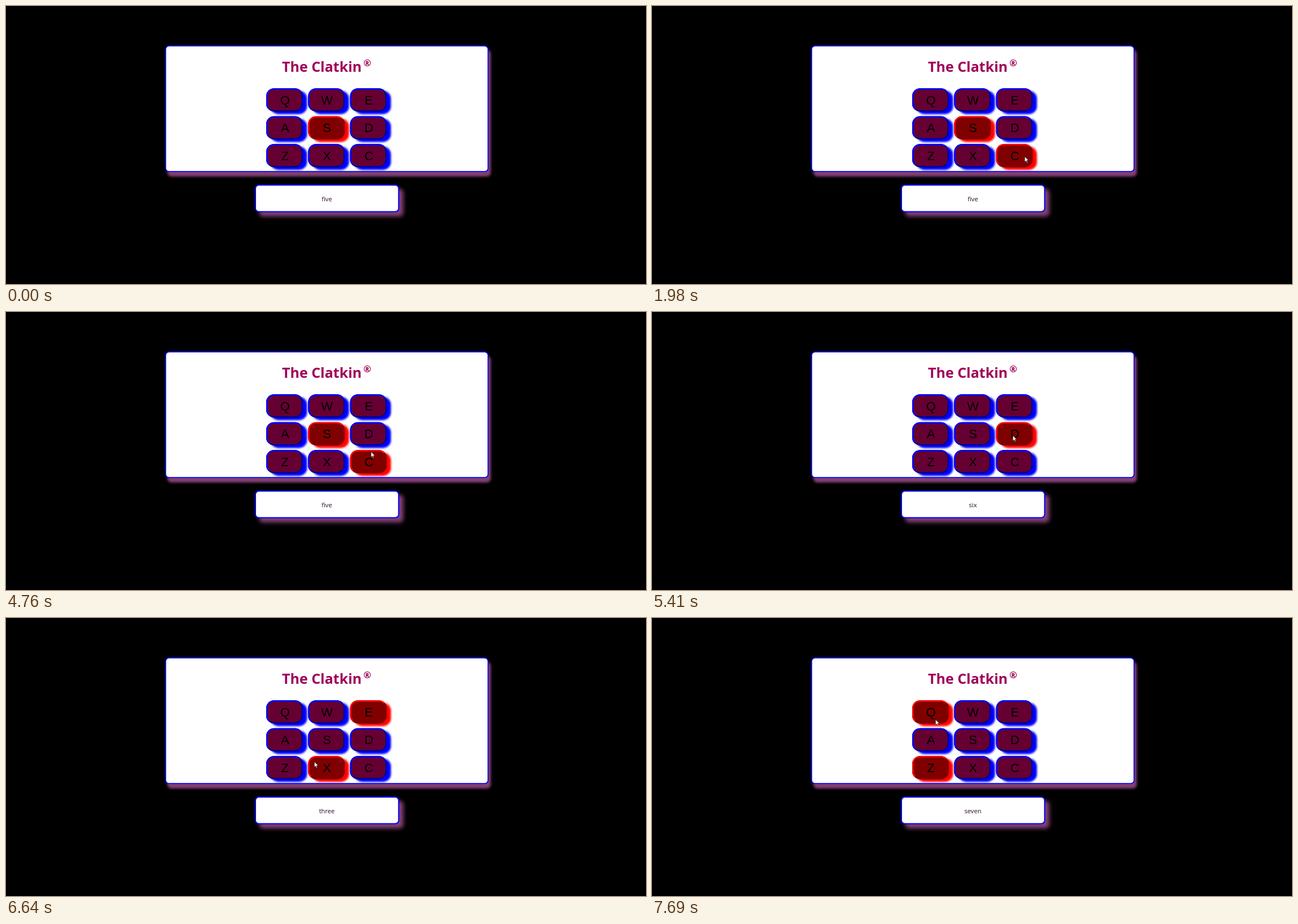
An HTML page with a canvas for the animation above (8 s loop, 1134 by 494 pixels).

```html
<!DOCTYPE html>
<html lang="en">
<head>
<meta charset="utf-8">
<title>Key pad</title>
<style>
  html, body { margin: 0; width: 100%; height: 100%; overflow: hidden; background: #000; }
  canvas { display: block; }
</style>
</head>
<body>
<canvas id="stage" width="1134" height="494"></canvas>
<script>
const ctx = document.getElementById('stage').getContext('2d');
const LOOP = 8000;
const STEP = 69; // the pointer moves in steps of about this many ms
const SANS = '"Open Sans", "Noto Sans", sans-serif';
const MAUVE = '#834074';
const KEY = { w: 65, h: 41.5, r: 14, border: 2.5 };

const keys = [...'QWEASDZXC'].map((label, i) => ({
  label,
  x: 461 + (i % 3) * 74.3,
  y: 146.2 + Math.floor(i / 3) * 49.5
}));

const presses = [
  { at: 0, key: 'S', word: 'five' },
  { at: 5270, key: 'D', word: 'six' },
  { at: 6050, key: 'E', word: 'three' },
  { at: 7170, key: 'Z', word: 'seven' }
];

// Where the pointer rests, and the time it takes to get there
const stops = [
  { at: 100, ms: 260, x: 687, y: 374 },
  { at: 670, ms: 210, x: 682, y: 307 },
  { at: 1190, ms: 260, x: 694, y: 307 },
  { at: 1700, ms: 280, x: 660, y: 267 },
  { at: 2280, ms: 580, x: 692, y: 369 },
  { at: 3420, ms: 200, x: 678, y: 369 },
  { at: 4430, ms: 520, x: 639, y: 219 },
  { at: 5660, ms: 190, x: 643, y: 167 },
  { at: 6050, ms: 70, x: 645, y: 175 },
  { at: 6190, ms: 450, x: 546, y: 255 },
  { at: 6710, ms: 140, x: 506, y: 263 },
  { at: 7170, ms: 520, x: 502, y: 180 }
];

const easeOut = p => 1 - (1 - p) ** 1.5;

function pointerAt(t) {
  let pos = { x: 1187, y: 522 };
  for (const { at, ms, x, y } of stops) {
    if (t < at) break;
    const gaps = Math.round(ms / STEP);
    const done = Math.floor((t - at) / ms * gaps + 0.2) + 1;
    const p = easeOut(Math.min(1, done / (gaps + 1)));
    pos = { x: pos.x + (x - pos.x) * p, y: pos.y + (y - pos.y) * p };
  }
  return pos;
}

function fillRound(x, y, w, h, r, color) {
  ctx.beginPath();
  ctx.roundRect(x, y, w, h, r);
  ctx.fillStyle = color;
  ctx.fill();
}

function shadowed(dx, dy, blur, color, draw) {
  ctx.save();
  ctx.shadowOffsetX = dx;
  ctx.shadowOffsetY = dy;
  ctx.shadowBlur = blur;
  ctx.shadowColor = color;
  draw();
  ctx.restore();
}

function text(str, x, y, font, color, align = 'center') {
  ctx.font = font;
  ctx.fillStyle = color;
  ctx.textAlign = align;
  ctx.fillText(str, x, y);
}

function panel(x, y, w, h, border, dx, dy, blur) {
  shadowed(dx, dy, blur, MAUVE, () => fillRound(x, y, w, h, 7, '#00f'));
  fillRound(x + border, y + border, w - 2 * border, h - 2 * border, 7 - border, '#fff');
}

function drawKey({ label, x, y }, lit) {
  const { w, h, r, border } = KEY;
  const bright = lit ? '#f00' : '#00f';
  const dark = lit ? '#800000' : '#000090';
  shadowed(7.5, 4.5, 3.5, bright, () => fillRound(x, y, w, h, r, dark));
  // Bright top and left edges of the raised border
  ctx.save();
  ctx.beginPath();
  ctx.moveTo(x - 1, y + h + 1);
  ctx.lineTo(x - 1, y - 1);
  ctx.lineTo(x + w + 1, y - 1);
  ctx.lineTo(x + w - h / 2, y + h / 2);
  ctx.lineTo(x + h / 2, y + h / 2);
  ctx.clip();
  fillRound(x, y, w, h, r, bright);
  ctx.restore();
  fillRound(x + border, y + border, w - 2 * border, h - 2 * border, r - border,
    lit ? '#800000' : '#660033');
  text(label, x + w / 2 + 0.8, Math.round(y + 28.4),
    '22px "Liberation Sans", Arial, sans-serif', '#000');
}

function drawPointer({ x, y }) {
  ctx.save();
  ctx.translate(x, y);
  ctx.scale(0.62, 0.62);
  ctx.beginPath();
  ctx.moveTo(0.5, 0.8);
  ctx.lineTo(0.5, 16.5);
  ctx.lineTo(4.2, 13);
  ctx.lineTo(6.6, 18.5);
  ctx.lineTo(9, 17.5);
  ctx.lineTo(6.7, 12.2);
  ctx.lineTo(11.8, 12.2);
  ctx.closePath();
  ctx.fillStyle = '#fff';
  ctx.fill();
  ctx.strokeStyle = '#000';
  ctx.stroke();
  ctx.restore();
}

function draw(t) {
  const pointer = pointerAt(t);
  const pressed = presses.filter(p => p.at <= t).pop();
  const hovered = k =>
    pointer.x >= k.x && pointer.x <= k.x + KEY.w &&
    pointer.y >= k.y && pointer.y <= k.y + KEY.h;

  ctx.fillStyle = '#000';
  ctx.fillRect(0, 0, 1134, 494);

  panel(282, 70, 573, 225, 1.7, 4, 8, 4);
  text('The Clatkin', 489, 117, `bold 25px ${SANS}`, '#a00058', 'left');
  text('®', 640, 106.5, `bold 16.5px ${SANS}`, '#a00058');
  for (const k of keys) drawKey(k, k.label === pressed.key || hovered(k));

  panel(441, 317.3, 255.7, 49.2, 2, 7.5, 7.5, 7);
  text(pressed.word, 568.5, 346.5, `11.2px ${SANS}`, '#2a0a2a');

  drawPointer(pointer);
}

const begin = performance.now();
function frame() {
  draw((performance.now() - begin) % LOOP);
  requestAnimationFrame(frame);
}
frame();
</script>
</body>
</html>
```
